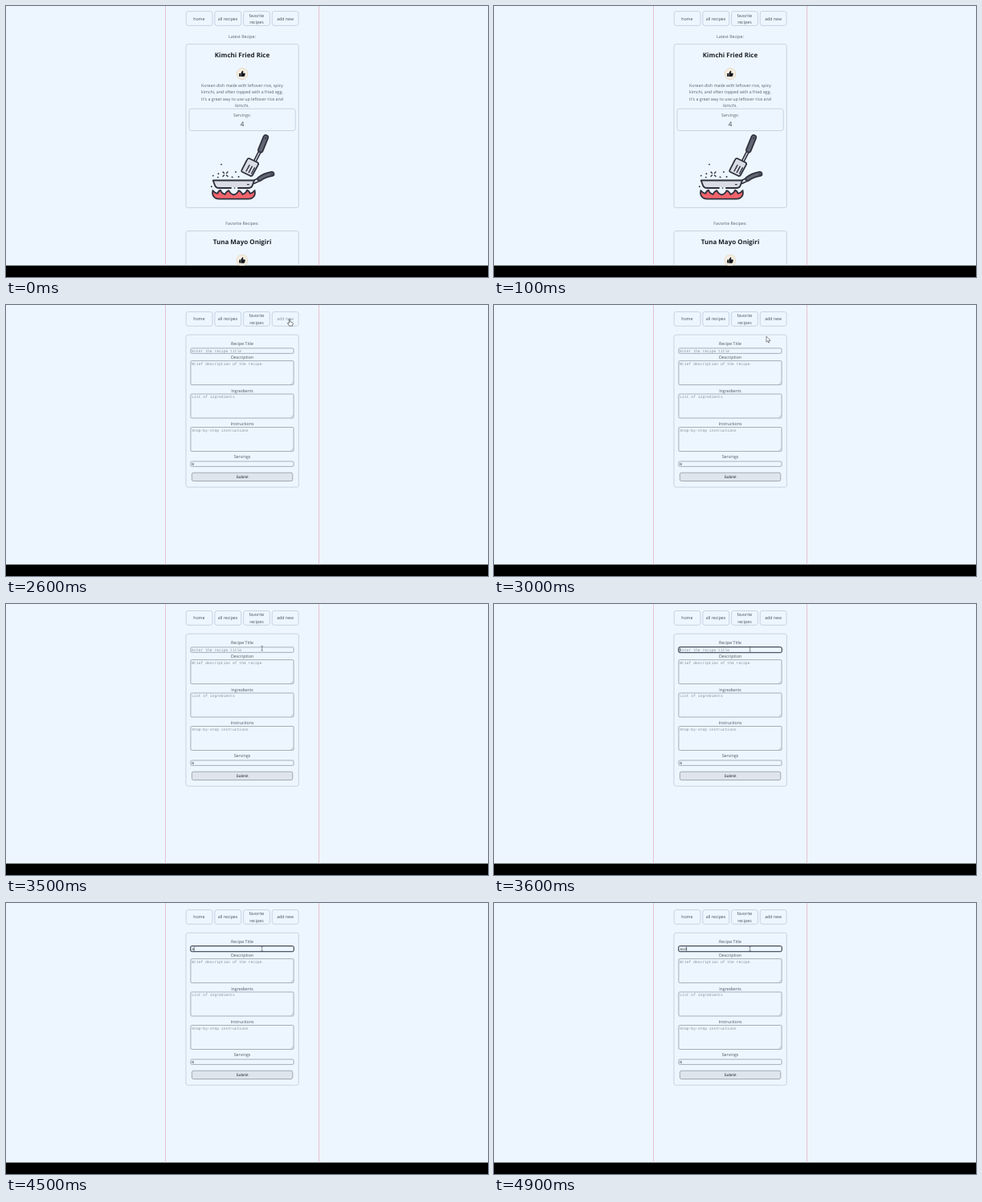
Write an HTML page that moves like this. It is 600 px wide and 338 px high and loops after 5000 ms.

```html
<!DOCTYPE html>
<html lang="en">
<head>
<meta charset="utf-8">
<title>Recipe form</title>
<style>
html, body { margin: 0; width: 100%; height: 100%; overflow: hidden; background: #000; }
svg { display: block; width: 100vw; height: 100vh; }
text { font: 5.27px "Open Sans", "Noto Sans", sans-serif; fill: #56606c; text-anchor: middle; text-rendering: geometricPrecision; }
.nav { font-weight: 500; fill: #454f5b; }
.nav.hover { fill: #8d98a6; }
.title { font-size: 8px; font-weight: 700; fill: #1d222a; }
.count { font-size: 8px; fill: #39424d; }
.label { font-weight: 500; fill: #4a545f; }
.mono { font: 4.7px "Liberation Mono", "Courier New", monospace; fill: #858d97; text-anchor: start; }
.value { fill: #22272e; }
.submit { font: 4.8px "Liberation Sans", Arial, sans-serif; fill: #22272e; }
.card { fill: none; stroke: #bccbdc; stroke-width: .8; }
.field { fill: none; stroke: #7f8995; stroke-width: .65; }
.ink { stroke: #2e303d; stroke-width: 1.8; stroke-linejoin: round; stroke-linecap: round; }
</style>
</head>
<body>
<svg viewBox="0 0 600 338" preserveAspectRatio="none">
  <rect width="600" height="338"/>
  <rect width="600" height="323.7" fill="#edf6fe"/>
  <path d="M198.5 0V323.7M389.5 0V323.7" stroke="#e7bdd2" stroke-width=".9"/>
  <clipPath id="view"><rect width="600" height="323.7"/></clipPath>
  <g clip-path="url(#view)">
    <g id="home"></g>
    <g id="form"></g>
    <g id="pointer"></g>
  </g>
</svg>
<script>
const $ = id => document.getElementById(id);
const text = (x, y, str, cls = '') => `<text x="${x}" y="${y}" class="${cls}">${str}</text>`;
const box = (x, y, w, h, r, cls) =>
  `<rect x="${x}" y="${y}" width="${w}" height="${h}" rx="${r}" class="${cls}"/>`;
const line = (d, color, width) =>
  `<path d="${d}" fill="none" stroke="${color}" stroke-width="${width}" stroke-linecap="round"/>`;

const nav = (y, id) =>
  [224.2, 259.9, 295.6, 331.3].map(x => box(x, y, 32.8, 17.8, 2.6, 'card')).join('') +
  text(240.3, y + 10.9, 'home', 'nav') +
  text(276.1, y + 10.9, 'all recipes', 'nav') +
  text(311.9, y + 6.9, 'favorite', 'nav') +
  text(311.9, y + 15.2, 'recipes', 'nav') +
  `<g id="${id}">${text(347.6, y + 10.9, 'add new', 'nav')}</g>`;

const like = y => `<g transform="translate(294 ${y})">
  <circle r="7" fill="#f6eee2" stroke="#e3d5bf" stroke-width=".8"/>
  <path d="M-3.8-.6h1.7v4h-1.7zM-1.7-.6L.1-3.8Q1.3-4.2 1.3-2.6L1-.9H3.1Q4.1-.8 3.8.2L3.1 2.7Q2.9 3.5 2 3.5H-1.7z" fill="#15191f"/>
</g>`;

function cooking() {
  const ink = '#2e303d', steel = '#d9dce5', grip = '#626674';
  const spatula =
    line('M315.5 182.5L309.6 194', ink, 4.4) + line('M315.5 182.5L309.6 194', steel, 1.3) +
    line('M323.3 164L317 179.5', ink, 7.6) + line('M323.3 164L317 179.5', grip, 4.2) +
    line('M323.3 164.4l-.4 1', ink, 1.5) +
    `<path class="ink" fill="${steel}" d="M303 190.2L313.3 195.3Q315 196.4 313.6 198.6L307 210.8Q306 212.6 304 211.8L294.2 207Q292.5 206 293.7 204.2L300 191.8Q301 189.6 303 190.2Z"/>` +
    line('M303 198.6l-4 7.4M306.3 200.2l-4 7.4M309.4 201.8l-3.8 7.2', ink, 1.4);
  const pan =
    line('M308.5 219.5L315 216.4', ink, 5.4) + line('M308.5 219.5L315 216.4', steel, 2.2) +
    line('M315.8 215.6Q321 211.5 331 209.4', ink, 6.8) + line('M315.8 215.6Q321 211.5 331 209.4', grip, 3.4) +
    line('M330.4 209.7l.8-.2', ink, 1.3) +
    `<path class="ink" fill="${steel}" d="M257.7 217.5H309L306.8 223.6Q305.7 227 301.6 227H265.2Q261.2 227 260 223.6Z"/>` +
    line('M281.6 227h5.8', '#edf6fe', 2.2) + line('M284.4 227h.2', ink, 1.5) +
    line('M300.5 222.6h1.8', ink, 1.3);
  const flame =
    `<path class="ink" fill="#f2646c" d="M257.4 230Q260 233.5 263.4 233.8Q264 230.8 267 229.6Q268.4 233.8 272.5 235Q274.3 231.2 277.4 230.2Q279.3 234.5 283.5 235.5Q287.7 234.5 289.6 230.2Q292.7 231.2 294.5 235Q298.6 233.8 300 229.6Q303 230.8 303.6 233.8Q307 233.5 309.6 230Q311.2 236.5 306.4 239.5Q304.7 240.6 301 240.6H266Q262.3 240.6 260.6 239.5Q255.8 236.5 257.4 230Z"/>`;
  const sparks =
    line('M270 207l1.5 1.5M276 207l-1.5 1.5M270 212.6l1.5-1.5M276 212.6l-1.5-1.5', ink, 1.4) +
    [[268, 197.6], [257.8, 211.6], [264.4, 209.2], [255.8, 225.2], [286, 207], [289.6, 213], [281.6, 213.4], [263.8, 213.6]]
      .map(([x, y]) => `<circle cx="${x}" cy="${y}" r=".95" fill="${ink}"/>`).join('');
  return flame + pan + spatula + sparks;
}

const blurb = ['Korean dish made with leftover rice, spicy', 'kimchi, and often topped with a fried egg.',
  "It's a great way to use up leftover rice and", 'kimchi.'];

$('home').innerHTML = nav(6.6, 'add1') +
  text(294, 39.6, 'Latest Recipe:') +
  box(224, 47.6, 140.4, 204, 2.6, 'card') +
  text(294, 64.4, 'Kimchi Fried Rice', 'title') + like(84.6) +
  blurb.map((s, i) => text(294, 100.8 + i * 8.4, s)).join('') +
  box(228, 128.2, 132.2, 27.3, 2.6, 'card') +
  text(294, 137.5, 'Servings:') + text(294, 149.6, '4', 'count') +
  cooking() +
  text(294, 272.7, 'Favorite Recipes:') +
  box(224, 280.6, 140.4, 204, 2.6, 'card') +
  text(294, 297.3, 'Tuna Mayo Onigiri', 'title') + like(317.2);

const area = (y, label, hint) =>
  text(294, y - 2.3, label, 'label') + box(229.9, y, 128.2, 30, 1.4, 'field') +
  text(231.3, y + 5, hint, 'mono') +
  line(`M354.8 ${y + 29}l2.4-2.4M356.4 ${y + 29}l.8-.8`, '#8a939e', .45);

$('form').innerHTML = nav(8.5, 'add2') +
  box(224, 37.2, 140.4, 190, 2.6, 'card') +
  text(294, 50.2, 'Recipe Title', 'label') +
  box(229.9, 53.9, 128.2, 6.5, 1.4, 'field') +
  '<rect id="focus" x="229.6" y="53.6" width="128.8" height="7.1" rx="2" fill="none" stroke="#303a47" stroke-width=".95"/>' +
  text(231.3, 58.8, 'Enter the recipe title', 'mono" id="hint') +
  text(231.3, 58.8, '', 'mono value" id="typed') +
  '<rect id="caret" y="54.6" width=".6" height="5" fill="#22272e"/>' +
  area(69.6, 'Description', 'Brief description of the recipe') +
  area(111, 'Ingredients', 'List of ingredients') +
  area(152.5, 'Instructions', 'Step-by-step instructions') +
  text(294, 191.3, 'Servings', 'label') +
  box(229.9, 195, 128.2, 6.4, 1.4, 'field') + text(231.3, 199.8, '0', 'mono value') +
  '<rect x="231.4" y="209.2" width="125.4" height="10.4" rx="2" fill="#dfe5ec" stroke="#858c95" stroke-width=".7"/>' +
  text(294, 216.1, 'Submit', 'submit');

const shapes = {
  hand: '<path d="M-.7.2Q0-.7.7.2V3.1L3.6 3.9Q4.4 4.2 4.2 5.2L3.5 8.2H-.2L-2.6 5Q-2.4 4-.7 5.1Z" fill="#fff" stroke="#303640" stroke-width=".65"/>',
  arrow: '<path d="M0 0V7.2L1.7 5.7 2.8 8.1 3.9 7.6 2.8 5.3H5Z" fill="#fff" stroke="#303640" stroke-width=".55"/>',
  beam: '<path d="M-1.3-2.9Q0-2.9 0-2.2Q0-2.9 1.3-2.9M0-2.2V2.2M-1.3 2.9Q0 2.9 0 2.2Q0 2.9 1.3 2.9" fill="none" stroke="#4a525c" stroke-width=".6"/>'
};

// time, x, y, pointer shape
const path = [
  [2600, 353, 17.8, 'hand'], [2700, 352, 19.2, 'hand'], [2800, 349.5, 23, 'hand'],
  [2900, 345, 30, 'arrow'], [3000, 339, 39, 'arrow'], [3100, 332, 47, 'arrow'],
  [3200, 326, 51.5, 'arrow'], [3300, 321.5, 54.5, 'beam'], [3400, 319.4, 55.2, 'beam'],
  [3500, 318.7, 55.4, 'beam'], [3600, 318.7, 56, 'beam'], [3900, 318.6, 56.7, 'beam']
];
const typing = [[0, ''], [4500, 'a'], [4700, 'as'], [4900, 'asd']];
const at = (steps, t) => steps.filter(s => s[0] <= t).pop();
const show = (id, on) => $(id).setAttribute('visibility', on ? 'inherit' : 'hidden');
let last = -1;

function draw(t) {
  const onForm = t >= 2600;
  $('home').setAttribute('visibility', onForm ? 'hidden' : 'visible');
  $('form').setAttribute('visibility', onForm ? 'visible' : 'hidden');
  $('add1').firstChild.classList.toggle('hover', t >= 2200);
  $('add2').firstChild.classList.toggle('hover', t < 2900);

  const word = at(typing, t)[1];
  $('typed').textContent = word;
  show('hint', !word);
  show('focus', t >= 3600);
  show('caret', t >= 3600 && (t < 4200 || t >= 4500));
  $('caret').setAttribute('x', 231 + word.length * 2.82);

  const p = at(path, t);
  $('pointer').innerHTML = p ? `<g transform="translate(${p[1]} ${p[2]})">${shapes[p[3]]}</g>` : '';
}

function tick() {
  const t = Math.floor(performance.now() % 5000 / 100) * 100;
  if (t !== last) draw(last = t);
  requestAnimationFrame(tick);
}
tick();
</script>
</body>
</html>
```
